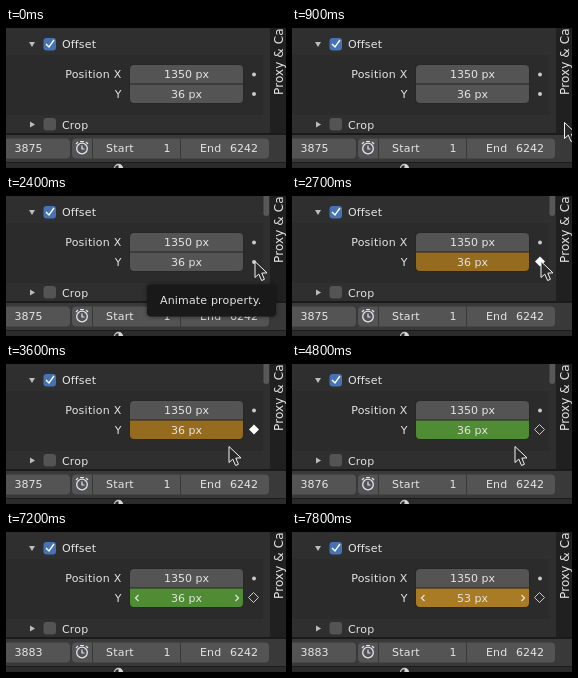
Animation of 280x140 px, one loop 8000 ms. Source, as an HTML page with a canvas:

```html
<!DOCTYPE html>
<html>
<head>
<meta charset="utf-8">
<style>
html, body { margin: 0; width: 100%; height: 100%; overflow: hidden; background: #2f2f2f; }
canvas { display: block; }
</style>
</head>
<body>
<canvas id="stage" width="280" height="140"></canvas>
<script>
const c = document.getElementById('stage').getContext('2d');
const LOOP = 8000, STEP = 300;
const LIGHT = '#e4e4e4', FIELD = '#545454';
const GOLD = '#946b1f', GREEN = '#508c34', EDIT = '#a97b24';

// Moments at which the scene changes, in ms.
const ENTER = 900, TIP = 2100, KEYED = 2700, PLAY = 4800, HOVER = 6600, GRAB = 6900, DRAG = 7200;

const progress = (t, from, length) => Math.min(1, Math.max(0, (t - from) / length));
const mix = (a, b, p) => a + (b - a) * p;
const easeOut = p => 1 - (1 - p) ** 2;

function box(x, y, w, h, color, radius = 0) {
  c.fillStyle = color;
  c.beginPath();
  c.roundRect(x, y, w, h, radius);
  c.fill();
}

function text(s, x, y, align = 'left', spacing = 0.15, size = 11) {
  c.font = size + 'px "DejaVu Sans", sans-serif';
  c.letterSpacing = spacing + 'px';
  c.textAlign = align;
  c.fillStyle = LIGHT;
  c.fillText(s, x, y);
}

function disc(x, y, r, fill, stroke) {
  c.beginPath();
  c.arc(x, y, r, 0, 7);
  if (fill) { c.fillStyle = fill; c.fill(); }
  if (stroke) { c.strokeStyle = stroke; c.lineWidth = 1.3; c.stroke(); }
}

// Draws an SVG path with its own origin at x, y.
function shape(x, y, d, fill, stroke, width = 1) {
  const path = new Path2D(d);
  c.save();
  c.translate(x, y);
  if (fill) { c.fillStyle = fill; c.fill(path); }
  if (stroke) { c.strokeStyle = stroke; c.lineWidth = width; c.stroke(path); }
  c.restore();
}

function panel(t) {
  box(0, 0, 280, 140, '#2f2f2f');
  box(0, 27, 257, 60, '#2b2b2b');
  box(264, 0, 16, 105, '#202020');
  c.save();
  c.translate(277, 67);
  c.rotate(-Math.PI / 2);
  text('Proxy & Cache', 0, 0, 'left', 0.1, 12);
  c.restore();
  if (t > ENTER && t < HOVER) box(257.5, -10, 5.5, 30, '#585858', 3);

  shape(26, 16.5, 'M-3-2.5H3L0 2.5Z', '#bcbcbc');
  shape(26, 96.5, 'M-2-3V3L3 0Z', '#bcbcbc');
  box(37.5, 10, 12.5, 12.5, '#4772b3', 3);
  shape(40, 16, 'M0 0L3 3L8-4', null, '#fff', 1.4);
  box(37.5, 90, 12.5, 12.5, FIELD, 3);
  text('Offset', 56, 20);
  text('Crop', 56, 101);
  text('Position X', 115.5, 50, 'right', 0.25);
  text('Y', 115.5, 70, 'right');
}

function fields(t) {
  const color = t < KEYED ? FIELD : t < PLAY ? GOLD : t > DRAG ? EDIT : GREEN;
  const value = Math.round(mix(36, 53, easeOut(progress(t, DRAG, 2 * STEP))));
  box(123.5, 36.5, 114, 39, '#242424', 4);
  box(124, 37, 113, 18.5, FIELD, [4, 4, 0, 0]);
  box(124, 56.5, 113, 18.5, color, [0, 0, 4, 4]);
  text('1350 px', 180.5, 50, 'center', 0);
  text(value + ' px', 180.5, 70, 'center', 0);
  if (t >= GRAB) {
    shape(129.5, 66, 'M3-3L0 0L3 3', null, LIGHT, 1.2);
    shape(232.5, 66, 'M-3-3L0 0L-3 3', null, LIGHT, 1.2);
  }

  disc(248, 46.5, 2, '#cacaca');
  const diamond = 'M0-5L5 0L0 5L-5 0Z';
  if (t < KEYED) disc(248, 66, 2, '#cacaca');
  else if (t < PLAY) shape(248, 65.5, diamond, '#fff');
  else shape(247.5, 65.5, diamond, null, '#cacaca');
}

function timeline(t) {
  const played = t < PLAY ? 0 : Math.min(8, 1 + 2 * (t - PLAY) / STEP);
  box(0, 105, 280, 35, '#1b1b1b');
  box(0, 107, 280, 27, '#393939');
  box(-5, 110.5, 69, 20, FIELD, 4);
  box(66, 110.5, 197, 20, FIELD, 4);
  for (const x of [86, 174]) box(x, 110.5, 1, 20, '#393939');

  shape(76, 120.5, 'M0-3V.5H2.5M-2-7H2M-6-4.5L-4-6.5M6-4.5L4-6.5', null, '#dfe5f2', 1.2);
  disc(76, 120.5, 5.3, null, '#dfe5f2');
  text(3875 + played, 8.5, 124, 'left', 0);
  text('Start', 100, 124, 'left', 0.2);
  text('1', 164.5, 124, 'right', 0);
  text('End', 194, 124);
  text('6242', 252, 124, 'right', 0);

  box(0, 135, 280, 5, '#2b2b2b');
  disc(112.5, 140.5, 4, null, '#c8c8c8');
  shape(112.5, 140.5, 'M0 0V-4Q4-4 4 0Z', '#d8d8d8');
}

function tooltip() {
  c.save();
  c.shadowColor = 'rgba(0,0,0,.5)';
  c.shadowBlur = 4;
  box(141, 88.5, 129, 32, '#191919', 4);
  c.restore();
  text('Animate property.', 154, 108, 'left', 0.17);
}

function pointer(t) {
  if (t < ENTER) return;
  if (t < HOVER) {
    const come = progress(t, ENTER, STEP), leave = progress(t, KEYED, 2 * STEP);
    const x = mix(mix(272, 248.5, come), 222.5, leave);
    const y = mix(mix(94, 65, come), 82, leave);
    shape(x + .5, y + .5, 'M0 0V16L3.8 12.6L6.6 19L9.4 17.8L6.8 11.6L12 11.4Z', '#282828', '#f4f4f4');
  } else if (t < DRAG) {
    const x = mix(212, 197, progress(t, HOVER, STEP));
    shape(x, 69.5, 'M-3-1H3V-6L11 0L3 6V1H-3V6L-11 0L-3-6Z', '#282828', '#f4f4f4');
  }
}

function draw(t) {
  panel(t);
  fields(t);
  timeline(t);
  if (t >= TIP && t < KEYED) tooltip();
  pointer(t);
}

const start = performance.now();
function tick() {
  const t = (performance.now() - start) % LOOP;
  draw(Math.floor(t / STEP) * STEP);
  requestAnimationFrame(tick);
}
tick();
</script>
</body>
</html>
```
